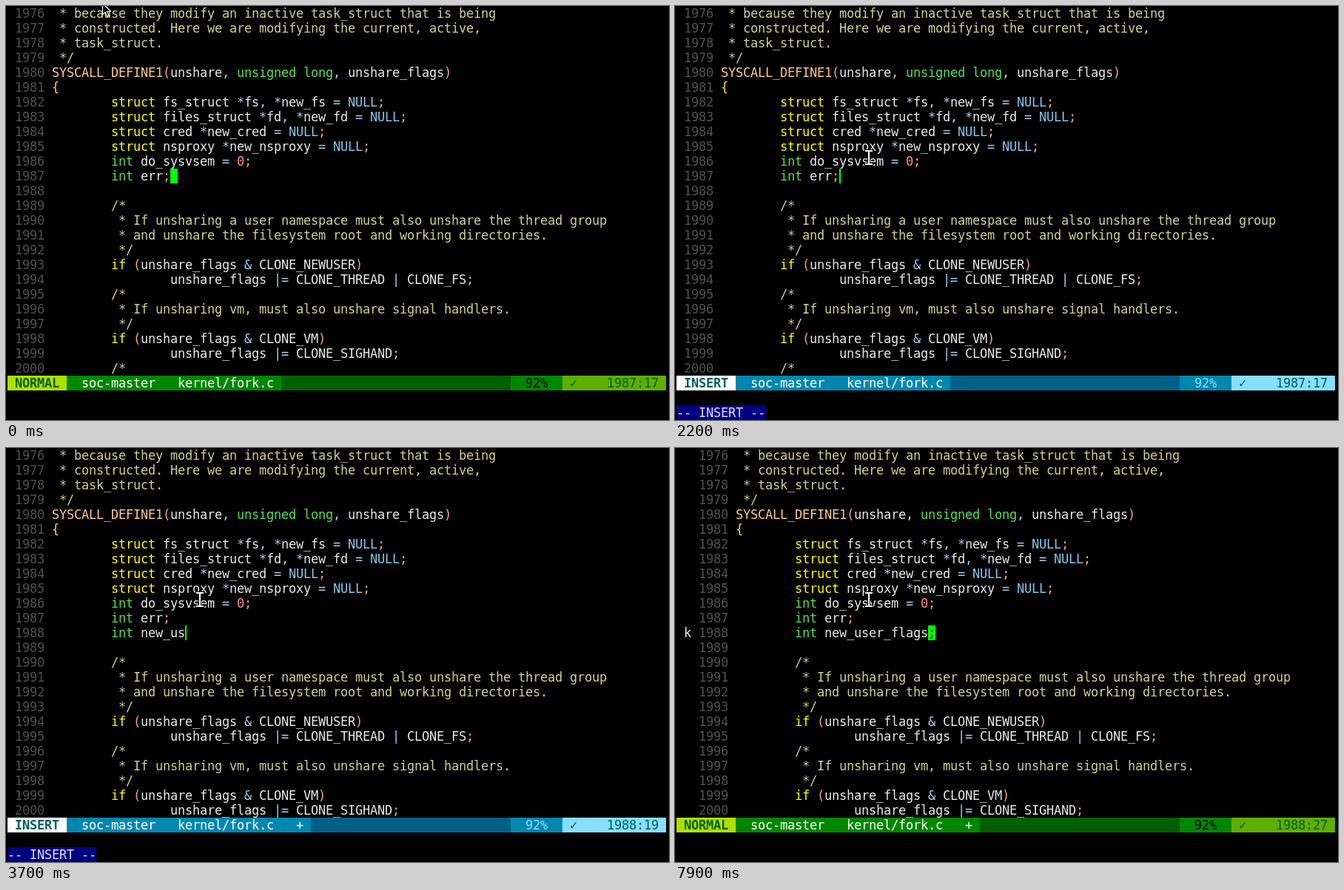
Recreate the animation shown at these times as an HTML page with a canvas. Size 896 by 560 pixels, loop 8 s.

```html
<!DOCTYPE html>
<html lang="en">
<head>
<meta charset="utf-8">
<title>Editor session</title>
<style>
html, body { margin: 0; width: 100%; height: 100%; overflow: hidden; background: #000; }
canvas { display: block; }
</style>
</head>
<body>
<canvas id="stage" width="896" height="560"></canvas>
<script>
const ctx = document.getElementById('stage').getContext('2d');
const LOOP = 8000, CELL = 10, ROW = 20, PAD = 2;
const FONT = '17px "DejaVu Sans Mono", monospace';
const FIRST = 1976, NEW_ROW = 12, TEXT_ROWS = 25;
const GREEN = '#00ff00', WHITE = '#e8e8e8', KHAKI = '#d0d08c';

const source = [
  ' * because they modify an inactive task_struct that is being',
  ' * constructed. Here we are modifying the current, active,',
  ' * task_struct.',
  ' */',
  'SYSCALL_DEFINE1(unshare, unsigned long, unshare_flags)',
  '{',
  '\tstruct fs_struct *fs, *new_fs = NULL;',
  '\tstruct files_struct *fd, *new_fd = NULL;',
  '\tstruct cred *new_cred = NULL;',
  '\tstruct nsproxy *new_nsproxy = NULL;',
  '\tint do_sysvsem = 0;',
  '\tint err;',
  '',
  '\t/*',
  '\t * If unsharing a user namespace must also unshare the thread group',
  '\t * and unshare the filesystem root and working directories.',
  '\t */',
  '\tif (unshare_flags & CLONE_NEWUSER)',
  '\t\tunshare_flags |= CLONE_THREAD | CLONE_FS;',
  '\t/*',
  '\t * If unsharing vm, must also unshare signal handlers.',
  '\t */',
  '\tif (unshare_flags & CLONE_VM)',
  '\t\tunshare_flags |= CLONE_SIGHAND;',
  '\t/*'
].map(expand);

// What the new line holds from each moment on
const typing = [
  [2400, ''], [2800, '\ti'], [2900, '\tint'], [3100, '\tint n'], [3200, '\tint new'],
  [3400, '\tint new_'], [3700, '\tint new_us'], [3900, '\tint new_use'],
  [4000, '\tint new_user_'], [4200, '\tint new_user_fl'], [4300, '\tint new_user_fla'],
  [4500, '\tint new_user_flag'], [4600, '\tint new_user_flags'], [6200, '\tint new_user_flags;']
].map(([at, text]) => [at, expand(text)]);

const syntax = [
  [/^(struct|if)\b/, '#ffff00'],
  [/^(int|unsigned long)\b/, '#55df55'],
  [/^NULL\b/, '#87c5ee'],
  [/^SYSCALL_DEFINE1/, '#ffc78f'],
  [/^\d+/, '#ff8f8f'],
  [/^\w+/, WHITE],
  [/^[();]/, '#f5a878'],
  [/^[{}]/, '#ffd75f'],
  [/^[*,&|=]+/, '#b0d0f5'],
  [/^\s+/, WHITE]
];

const themes = {
  normal: { label: 'NORMAL', modeBg: '#afdf00', modeFg: '#005f00', midBg: '#008700',
            barBg: '#005f00', pctFg: '#000000', posBg: '#5faf00', posFg: '#005f00' },
  insert: { label: 'INSERT', modeBg: '#ffffff', modeFg: '#005f5f', midBg: '#0087af',
            barBg: '#005f87', pctFg: '#87dfff', posBg: '#87dfff', posFg: '#005f5f' }
};

function expand(text) { return text.replace(/\t/g, ' '.repeat(8)); }

function fill(col, row, cols, color) {
  ctx.fillStyle = color;
  ctx.fillRect(PAD + col * CELL, row * ROW, cols * CELL, ROW);
}

// One glyph per terminal cell
function write(text, col, row, color, bold) {
  ctx.font = (bold ? 'bold ' : '') + FONT;
  ctx.fillStyle = color;
  [...text].forEach((ch, i) => ctx.fillText(ch, PAD + (col + i) * CELL, row * ROW + 16));
}

function writeCode(line, col, row) {
  if (/^\s*(\/\*|\*)/.test(line)) {
    write(line, col, row, KHAKI);
    return;
  }
  while (line) {
    const [rule, color] = syntax.find(([re]) => re.test(line));
    const token = line.match(rule)[0];
    write(token, col, row, color);
    col += token.length;
    line = line.slice(token.length);
  }
}

function stateAt(t) {
  const insert = t >= 2200 && t < 7900;
  const step = typing.filter(([at]) => at <= t).pop();
  const lines = source.slice();
  let row = 11, col = 16;
  if (step) {
    lines.splice(NEW_ROW, 0, step[1]);
    row = NEW_ROW;
    col = step[1].length - (t >= 6600 ? 1 : 0);
  }
  return {
    insert, lines, row, col,
    sign: t >= 7900,
    changed: t >= 2500,
    position: t >= 2400 && t < 2500 ? '1987:17' : `${FIRST + row}:${col + 1}`
  };
}

function drawText(s) {
  const shift = s.sign ? 2 : 0, left = 6 + shift;
  for (let row = 0; row < TEXT_ROWS; row++) {
    write(String(FIRST + row), 1 + shift, row, '#505050');
    writeCode(s.lines[row], left, row);
  }
  if (s.sign) write('k', 1, s.row, WHITE);
  const col = left + s.col;
  if (s.insert) {
    fill(col, s.row, 0.2, GREEN);
  } else {
    fill(col, s.row, 1, GREEN);
    write(s.lines[s.row][s.col] || '', col, s.row, '#000');
  }
}

function drawStatus(s) {
  const c = themes[s.insert ? 'insert' : 'normal'], row = 25;
  fill(0, row, 8, c.modeBg);
  fill(8, row, 60, c.barBg);
  fill(8, row, s.changed ? 33 : 29, c.midBg);
  fill(68, row, 7, c.midBg);
  fill(75, row, 14, c.posBg);
  write(c.label, 1, row, c.modeFg, true);
  write('soc-master', 10, row, '#fff');
  write('kernel/fork.c', 23, row, '#fff');
  if (s.changed) write('+', 39, row, '#fff');
  write('92%', 70, row, c.pctFg);
  write('✓', 76, row, c.posFg);
  write(s.position, 81, row, c.posFg);
  if (s.insert) {
    fill(0, 27, 12, '#000080');
    write('-- INSERT --', 0, 27, '#dfdfff');
  }
}

function drawArrow(x, y) {
  const points = [[0, 0], [0, 15], [3.5, 12], [6.2, 17.5], [8.6, 16.4], [6, 11], [11, 10.6]];
  ctx.beginPath();
  points.forEach(([dx, dy]) => ctx.lineTo(x + dx, y + dy));
  ctx.closePath();
  ctx.fillStyle = '#000';
  ctx.fill();
  ctx.lineWidth = 1.2;
  ctx.strokeStyle = '#fff';
  ctx.stroke();
}

function drawBeam(x, y) {
  ctx.beginPath();
  for (const end of [-9, 9]) {
    ctx.moveTo(x - 4, y + end);
    ctx.lineTo(x + 4, y + end);
  }
  ctx.moveTo(x, y - 9);
  ctx.lineTo(x, y + 9);
  ctx.lineCap = 'square';
  for (const [width, color] of [[4, '#000'], [2, '#fff']]) {
    ctx.lineWidth = width;
    ctx.strokeStyle = color;
    ctx.stroke();
  }
}

function drawPointer(t) {
  // The pointer moves in seven steps of 100 ms
  const k = Math.min(7, Math.max(0, Math.floor((t - 800) / 100))) / 7;
  const e = k * k * (3 - 2 * k);
  if (k === 0) drawArrow(130.5, -3.5);
  else drawBeam(131 + 131 * e, 205 * e);
}

function frame() {
  const t = performance.now() % LOOP;
  const state = stateAt(t);
  ctx.fillStyle = '#000';
  ctx.fillRect(0, 0, 896, 560);
  drawText(state);
  drawStatus(state);
  drawPointer(t);
  requestAnimationFrame(frame);
}
frame();
</script>
</body>
</html>
```
